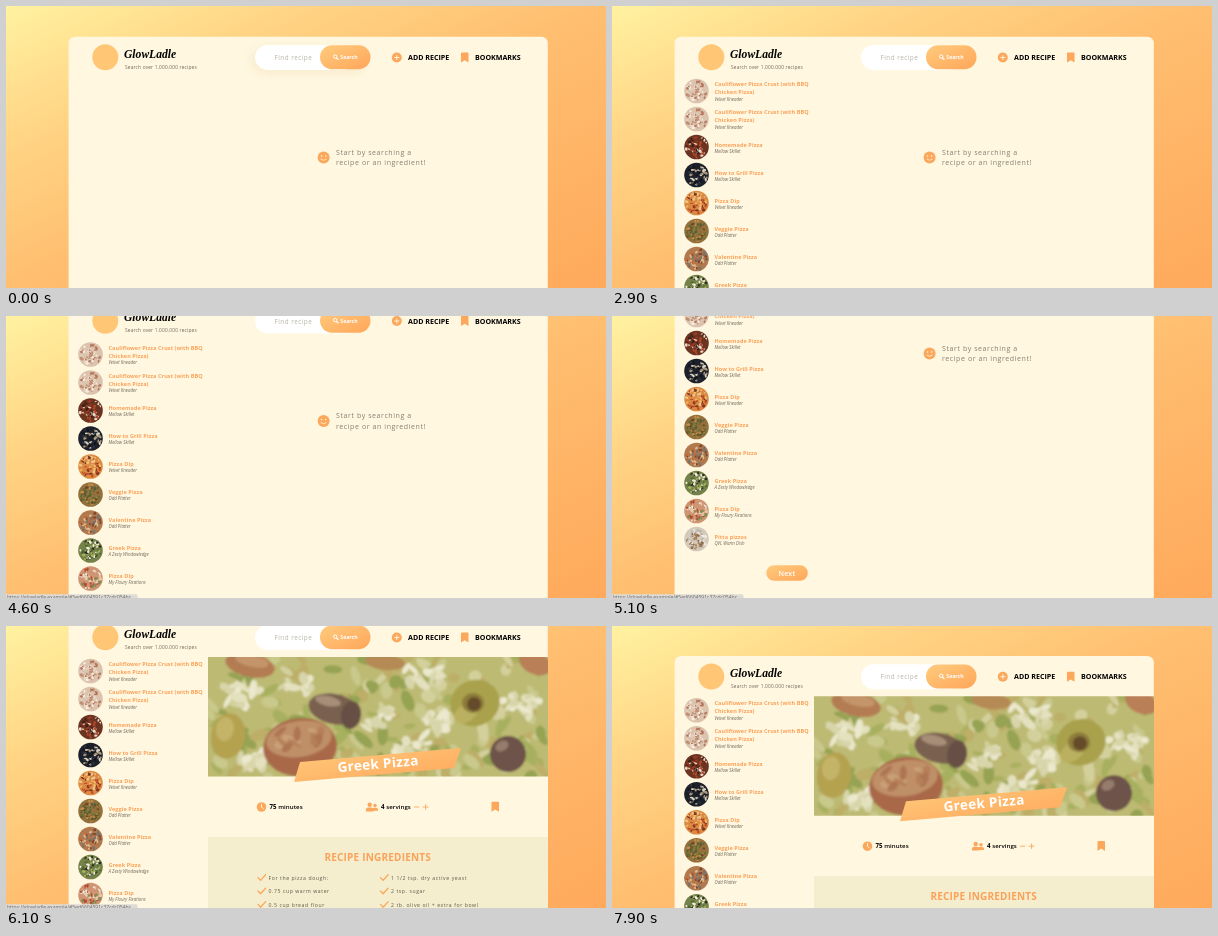
Write an HTML page that moves like this. It is 600 px wide and 282 px high and loops after 8000 ms.

```html
<!DOCTYPE html>
<html lang="en">
<head>
<meta charset="utf-8">
<title>Recipe search</title>
<style>
  html, body { margin: 0; width: 100%; height: 100%; overflow: hidden; background: #ffbe70; }
  svg { display: block; width: 100vw; height: 100vh; }
  text { font-family: "Open Sans", Lato, sans-serif; white-space: pre; }
  .logo { font: italic bold 11.6px "Liberation Serif", serif; }
  .tag { font-size: 4.8px; letter-spacing: .19px; fill: #6f6858; }
  .field { font-size: 6.3px; letter-spacing: .5px; }
  .btn { font-size: 5.2px; font-weight: 700; fill: #fff; }
  .nav { font-size: 7.1px; font-weight: 700; }
  .msg { font-size: 7px; letter-spacing: .59px; fill: #857e70; }
  .name { font-size: 5.5px; font-weight: 700; letter-spacing: .08px; fill: #fba158; }
  .by { font-size: 4.4px; font-style: italic; fill: #6f6858; }
  .next { font-size: 7px; font-weight: 600; letter-spacing: .2px; fill: #fff; }
  .title { font-size: 13.6px; font-weight: 700; letter-spacing: .3px; fill: #fff; }
  .info { font-size: 6.1px; font-weight: 600; letter-spacing: .05px; }
  .head { font-size: 10px; font-weight: 700; letter-spacing: .2px; fill: #fba158; }
  .item { font-size: 5.1px; letter-spacing: .6px; fill: #5c5648; }
  .link { font-size: 5px; fill: #666; }
</style>
</head>
<body>
<svg id="stage" viewBox="0 0 600 282" preserveAspectRatio="none"></svg>
<script>
const LOOP = 8000, STEP = 100;
const ORANGE = '#fba85c', CREAM = '#fff7e0';

const text = (cls, x, y, str, extra = '') =>
  `<text class="${cls}" x="${x}" y="${y}" ${extra}>${str}</text>`;
const circle = (x, y, r, fill) => `<circle cx="${x}" cy="${y}" r="${r}" fill="${fill}"/>`;
const oval = (x, y, rx, ry, fill, turn = 0) =>
  `<ellipse rx="${rx}" ry="${ry}" fill="${fill}" transform="translate(${x} ${y}) rotate(${turn})"/>`;
const line = (d, color, width) =>
  `<path d="${d}" fill="none" stroke="${color}" stroke-width="${width}" stroke-linecap="round" stroke-linejoin="round"/>`;
const flag = (x, y) =>
  `<path d="M${x} ${y + .8}q0-.8.8-.8h5.9q.8 0 .8.8v9.2l-3.75-2.4-3.75 2.4z" fill="${ORANGE}"/>`;

function random(seed) {
  return () => (seed = (seed * 16807) % 2147483647) / 2147483647;
}

// Recipe list: title lines, author, dish tones (first one is the base)
const crust = '#dcc3ae #f6efe6 #b5745a #e6d3c0 #c08f74';
const dishes = [
  [['Cauliflower Pizza Crust (with BBQ', 'Chicken Pizza)'], 'Velvet Kneader', crust],
  [['Cauliflower Pizza Crust (with BBQ', 'Chicken Pizza)'], 'Velvet Kneader', crust],
  [['Homemade Pizza'], 'Mellow Skillet', '#6b3421 #b5482b #eadccb #3a2118 #9a3a24'],
  [['How to Grill Pizza'], 'Mellow Skillet', '#1c2029 #a8967c #2c3340 #dcd2bd #12151b'],
  [['Pizza Dip'], 'Velvet Kneader', '#dc8a42 #c04a2a #f0bd6c #7c3420 #eac58c'],
  [['Veggie Pizza'], 'Odd Platter', '#94713c #5f7034 #c08d4a #6e4527 #546338'],
  [['Valentine Pizza'], 'Odd Platter', '#b07a4e #dcbb92 #80472c #c46a3c #77736c'],
  [['Greek Pizza'], 'A Zesty Windowledge', '#74824a #efeadb #2d2a20 #a8b45c #4c6130'],
  [['Pizza Dip'], 'My Floury Fixations', '#cf9474 #f3e8da #b14a30 #e8c9a8 #7f8f52'],
  [['Pitta pizzas'], 'QVL Warm Dish', '#d3cabc #f2eee6 #8a6a50 #b9b4ae #a88458']
];
const rowY = i => 85 + 28 * i;

function plate(i) {
  const tones = dishes[i][2].split(' '), rnd = random(911 * (Math.max(i, 1) + 3)), y = rowY(i);
  let out = circle(84.5, y, 12.3, tones[0]);
  for (let k = 0; k < 54; k++) {
    const a = rnd() * 6.28, d = Math.sqrt(rnd()) * 10.6;
    out += oval(84.5 + d * Math.cos(a), y + d * Math.sin(a), .8 + rnd() * 1.4, .5 + rnd() * .9,
      tones[1 + k % 4], rnd() * 180);
  }
  return out;
}

function label(i) {
  const [lines, author] = dishes[i], y = rowY(i);
  const first = lines.length > 1 ? y - 5 : y - .5;
  return lines.map((s, k) => text('name', 102.5, first + 8.3 * k, s)).join('') +
    text('by', 102.5, y + (lines.length > 1 ? 9.6 : 5.8), author);
}

const rows = fn => dishes.map((_, i) => fn(i)).join('');

function photo() {
  const rnd = random(4021);
  // Loose pieces scattered around a centre
  const scatter = (n, x, y, w, h, size, tones) => {
    let out = '';
    for (let k = 0; k < n; k++)
      out += oval(x + (rnd() * 2 - 1) * w, y + (rnd() * 2 - 1) * h, size * (.6 + rnd()), size * (.3 + rnd() * .5),
        tones[k % tones.length], rnd() * 180);
    return out;
  };
  const cheese = [[234, 108, 20, 10], [290, 98, 14, 8], [374, 133, 14, 10], [404, 158, 22, 9],
    [432, 134, 12, 9], [420, 90, 20, 8], [515, 118, 18, 10], [246, 176, 12, 8]];
  return '<rect x="195" y="64" width="354" height="134" fill="#bdba73"/>' +
    scatter(170, 372, 131, 172, 62, 8, ['#a7b05e', '#c9c98c', '#95a352', '#bdae68', '#d3d09c']) +
    cheese.map(([x, y, w, h]) => scatter(14, x, y, w, h, 6, ['#e4e1bf', '#d8d5aa', '#ebe8cd'])).join('') +
    oval(244, 79, 25, 12, '#b37b52', 12) + oval(246, 75, 17, 6, '#c4946a', 12) +
    oval(379, 76, 20, 8, '#b58a55', 6) + oval(529, 77, 17, 11, '#b97f57', 25) +
    oval(222, 150, 17, 23, '#b5a250', 10) + oval(219, 143, 9, 12, '#c3b468', 10) +
    oval(328, 123, 26, 15, '#7a6150', 12) + oval(345, 129, 10, 14, '#685044', 8) +
    oval(322, 115, 13, 5, '#a68e78', 12) +
    oval(294, 161, 37, 29, '#a9694a', -6) + oval(293, 153, 33, 18, '#bf8f68', -8) +
    scatter(16, 293, 153, 22, 9, 5, ['#b58058', '#c9a078', '#ad7552']) +
    oval(469, 117, 25, 23, '#a9a14c', -25) + oval(460, 127, 13, 9, '#bab060', -35) +
    oval(467, 117, 11, 10, '#8d7c3a') + oval(468, 118, 7, 7, '#654b2a') +
    oval(502, 168, 18, 18, '#6d5348') + oval(496, 160, 7, 5, '#957c6c', -30);
}

const tick = (x, y) => line(`M${x} ${y - 1.6}l2.6 2.8 5-5.6`, ORANGE, 1.3);
const left = ['For the pizza dough:', '0.75 cup warm water', '0.5 cup bread flour', '1 1/2 tsp. sea salt',
  '1 lb. pizza dough recipe above', '1 cup baby arugula', '0.67 cup cherry or grape tomatoes', 'Drizzle of good olive oil'];
const right = ['1 1/2 tsp. dry active yeast', '2 tsp. sugar', '2 tb. olive oil + extra for bowl',
  'For the greek pizza:', '1 lb. hummus any variety', '0.67 cup good pitted greek olives', '0.25 cup crumbled feta cheese'];
const items = (list, x) => list.map((s, i) => {
  const y = 294 + 13.4 * i + (i === 7 ? 9 : 0);
  return tick(x, y - .8) + text('item', x + 10.5, y, s);
}).join('');

const person = (x, y, s) => `<g transform="translate(${x} ${y}) scale(${s})" fill="${ORANGE}">
  <circle cy="-2.4" r="2.2"/><path d="M-3.8 4.2v-1.4q0-2.4 2.4-2.4h2.8q2.4 0 2.4 2.4v1.4z"/></g>`;

const recipe = `
  <rect x="202" y="71" width="340" height="700" fill="${CREAM}"/>
  <g clip-path="url(#frame)"><g filter="url(#soft)">${photo()}</g></g>
  <path d="M294 176L455 162L448 182L288 196z" fill="url(#warm)"/>
  ${text('title', 372, 182.7, 'Greek Pizza', 'text-anchor="middle" transform="rotate(-5 372 178)"')}
  ${circle(255.5, 221, 4.8, ORANGE)}${line('M255.5 218.2v3l1.8 1.4', CREAM, .9)}
  ${text('info', 263.5, 223.2, '<tspan font-weight="700">75</tspan> minutes')}
  ${person(369, 221.4, .8)}${person(363.7, 221.2, 1)}
  ${text('info', 375, 223.2, '<tspan font-weight="700">4</tspan> servings')}
  ${line('M408.3 221h4.6M417.2 221h4.8M419.6 218.6v4.8', ORANGE, .9)}
  ${flag(485.5, 215.8)}
  <rect x="202" y="251" width="340" height="500" fill="#f4eecf"/>
  ${text('head', 371.7, 274.7, 'RECIPE INGREDIENTS', 'text-anchor="middle"')}
  ${items(left, 252)}${text('item', 252, 384.4, 'halved')}${items(right, 374.5)}`;

const header = `
  ${circle(99.3, 51.3, 13, '#ffc676')}
  ${text('logo', 118, 51.8, 'GlowLadle')}
  ${text('tag', 119, 62.8, 'Search over 1.000.000 recipes')}
  <rect id="glow" x="245" y="41" width="116" height="27" rx="13.5" fill="#e8cf9c" opacity=".25" filter="url(#haze)"/>
  <rect x="249" y="39" width="100" height="25" rx="12.5" fill="#fff"/>
  <rect x="314" y="39.3" width="50.5" height="23.9" rx="11.9" fill="url(#warm)"/>
  <circle cx="329.2" cy="50.6" r="1.7" fill="none" stroke="#fff" stroke-width="1"/>
  ${line('M330.6 52l1.5 1.5', '#fff', 1.1)}
  ${text('btn', 334.3, 53.2, 'Search')}
  ${text('field', 268.5, 54, '', 'id="query"')}
  <rect id="caret" y="47" width=".7" height="9" fill="#222"/>
  ${circle(390.8, 51.5, 5, ORANGE)}${line('M388.6 51.5h4.4M390.8 49.3v4.4', CREAM, .9)}
  ${text('nav', 402, 54.2, 'ADD RECIPE')}
  ${flag(455, 46.6)}
  ${text('nav', 469, 54.2, 'BOOKMARKS')}`;

const hint = `
  ${circle(317.6, 151.4, 6, ORANGE)}
  ${circle(315.5, 150, .8, CREAM)}${circle(319.7, 150, .8, CREAM)}
  ${line('M315 153.2q2.6 2.6 5.2 0', CREAM, .8)}
  ${text('msg', 330, 148.8, 'Start by searching a')}
  ${text('msg', 330, 159, 'recipe or an ingredient!')}`;

document.getElementById('stage').innerHTML = `
  <defs>
    <linearGradient id="back" x1="0" y1="0" x2="1" y2="1">
      <stop stop-color="#fff2a1"/><stop offset=".25" stop-color="#ffd484"/>
      <stop offset=".5" stop-color="#ffbe70"/><stop offset="1" stop-color="#ffa95b"/>
    </linearGradient>
    <linearGradient id="warm" x1="0" y1="0" x2="1" y2="1">
      <stop stop-color="#ffcb7d"/><stop offset="1" stop-color="#ffa65a"/>
    </linearGradient>
    <clipPath id="frame"><rect x="202" y="71" width="340" height="119.6"/></clipPath>
    <filter id="soft"><feGaussianBlur stdDeviation="1"/></filter>
    <filter id="haze" x="-20%" y="-60%" width="140%" height="220%"><feGaussianBlur stdDeviation="4"/></filter>
  </defs>
  <rect width="600" height="282" fill="url(#back)"/>
  <g id="page">
    <rect x="62.6" y="30.7" width="479.2" height="740" rx="6.5" fill="${CREAM}"/>
    ${header}
    <g id="hint">${hint}</g>
    <g id="labels">${rows(label)}
      <rect x="154.3" y="363.3" width="41.5" height="15.4" rx="7.7" fill="url(#warm)"/>
      ${text('next', 175, 373.6, 'Next', 'text-anchor="middle"')}</g>
    <g id="plates">${rows(plate)}</g>
    <g id="recipe">${recipe}</g>
    <g id="spinner"><path d="M7.6-8.2A11.2 11.2 0 0 1 8 7.8" fill="none" stroke="${ORANGE}" stroke-width="3.2"/></g>
  </g>
  <g id="status">
    <path d="M0 278.3h130q1.5 0 1.5 1.5v3H0z" fill="#dedbd6"/>
    ${text('link', 1, 283.2, 'https://glowladle.example/#5ed6604591c37cdc054bc')}
  </g>`;

const el = {};
document.querySelectorAll('svg [id]').forEach(n => el[n.id] = n);
const show = (n, on) => n.setAttribute('display', on ? 'inline' : 'none');

const scrollKeys = [[3700, 0], [3800, .3], [4200, 15], [4600, 46.5], [4900, 87], [5100, 114], [5200, 120],
  [5800, 120], [5900, 110], [6000, 80], [6100, 40], [6200, 10], [6300, 0], [7800, 0], [7900, .8], [8000, .8]];

function tween(keys, t) {
  if (t <= keys[0][0]) return keys[0][1];
  const i = keys.findIndex(k => k[0] >= t), [t0, a] = keys[i - 1], [t1, b] = keys[i];
  return a + (b - a) * (t - t0) / (t1 - t0);
}

const strokes = [1100, 1300, 1400, 1500, 1700];

function draw(t) {
  const found = t >= 2600, opened = t >= 5600;
  const typed = found ? '' : 'pizza'.slice(0, strokes.filter(s => t >= s).length);

  el.query.textContent = typed || 'Find recipe';
  el.query.setAttribute('fill', typed ? '#222' : '#b8b2a9');
  show(el.caret, t >= 500 && t < 2800);
  el.caret.setAttribute('x', typed ? 268 + el.query.getComputedTextLength() : 268.6);
  show(el.glow, t < 2800);

  show(el.labels, found);
  show(el.plates, t >= 2800);
  show(el.hint, t < 5400);
  show(el.recipe, opened);

  const listBusy = t >= 1900 && !found, recipeBusy = t >= 5400 && !opened;
  const turn = (t - (listBusy ? 1900 : 5400)) * .18;
  show(el.spinner, listBusy || recipeBusy);
  el.spinner.setAttribute('transform', `translate(${listBusy ? 132.7 : 372} 152.3) rotate(${turn})`);

  show(el.status, t >= 3200 && t < 7100);
  el.status.setAttribute('opacity', Math.min(1, Math.max(0, (7100 - t) / 300)));
  el.page.setAttribute('transform', `translate(0 ${-tween(scrollKeys, t)})`);
}

// The picture advances ten times a second
function loop() {
  draw(Math.floor(performance.now() % LOOP / STEP) * STEP);
  requestAnimationFrame(loop);
}
loop();
</script>
</body>
</html>
```
